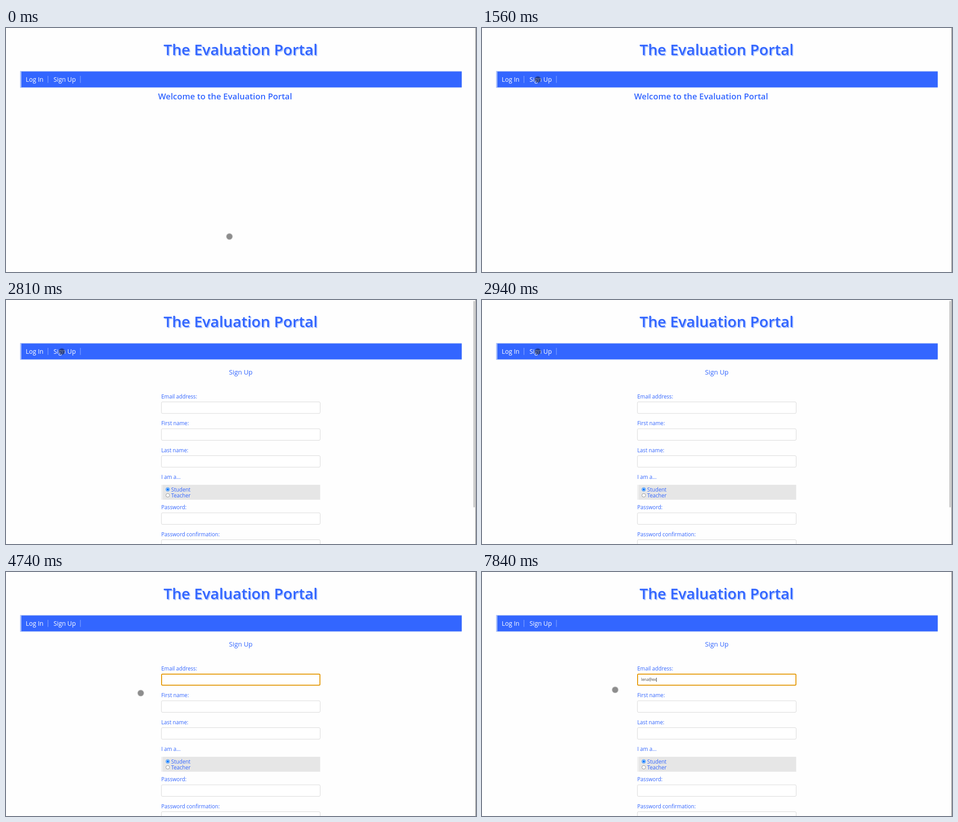
An HTML page for the animation above (8 s loop, 1036 by 540 pixels).

```html
<!DOCTYPE html>
<html lang="en">
<head>
<meta charset="utf-8">
<title>Sign up</title>
<style>
  html, body { margin: 0; width: 100%; height: 100%; overflow: hidden; background: #fefefe; }
  svg { display: block; font-family: "Open Sans", "Noto Sans", sans-serif; fill: #36f; }
  .title { font-size: 33px; font-weight: 600; text-anchor: middle; text-shadow: 2px 2px 1px #a9c2ff; }
  .welcome { font-size: 18.4px; font-weight: 600; text-anchor: middle; }
  .heading { font-size: 14.6px; font-weight: 500; text-anchor: middle; }
  .nav { font-size: 13.8px; fill: #fff; }
  .label { font-size: 11.7px; font-weight: 500; }
  .field { fill: #fff; stroke: #d6d6d6; }
  #link { stroke: #fff; }
  #value { font-size: 8.3px; fill: #444; }
</style>
</head>
<body>
<svg width="1036" height="540" viewBox="0 0 1036 540">
  <text class="title" x="517" y="60">The Evaluation Portal</text>
  <rect x="31" y="95.3" width="973.5" height="37" fill="#a9bff8"/>
  <rect x="34" y="96.5" width="970.5" height="34.6"/>
  <g class="nav">
    <text x="43.5" y="118.5">Log In</text>
    <text id="link" x="104.7" y="118.5">Sign Up</text>
    <path d="M92.5 106v15.5M164 106v15.5" stroke="#94b0ff"/>
  </g>

  <text id="home" class="welcome" x="483" y="157.5">Welcome to the Evaluation Portal</text>

  <g id="form">
    <text class="heading" x="517.5" y="164.5">Sign Up</text>
    <g id="fields"></g>
    <rect x="342.5" y="409" width="350" height="33" fill="#e6e6e6"/>
    <rect x="342.5" y="409" width="3" height="33" fill="#f0f0f0"/>
    <circle cx="356.5" cy="419.2" r="4" fill="#fff" stroke="#0075ff"/>
    <circle cx="356.5" cy="419.2" r="2.5" fill="#0075ff"/>
    <circle cx="356.5" cy="432.2" r="4" fill="#fff" stroke="#767676" stroke-width=".8"/>
    <text class="label" x="364" y="423.5">Student</text>
    <text class="label" x="364" y="436.5">Teacher</text>
    <rect id="focus" x="343" y="226" width="349" height="24.5" rx="2" fill="none" stroke="#e59700" stroke-width="2"/>
    <text id="value" x="350.8" y="241.2"></text>
    <rect id="caret" y="234" width="1" height="9" fill="#333"/>
    <rect id="thumb" x="1030.5" y="2" width="3" height="457" rx="1.5" fill="#bcbcbc"/>
  </g>

  <rect x="1035" width="1" height="540" fill="#666"/>
  <g id="cursor" fill="#000">
    <circle r="7.5" opacity=".2"/>
    <circle r="6.3" opacity=".3"/>
  </g>
</svg>
<script>
const LOOP = 8000;
const [link, home, form, fields, focusRing, value, caret, thumb, cursor] =
  ["link", "home", "form", "fields", "focus", "value", "caret", "thumb", "cursor"]
    .map(id => document.getElementById(id));

// label, baseline, top of its input box (if any)
fields.innerHTML = [
  ["Email address:", 217.7, 225.5], ["First name:", 277.2, 285],
  ["Last name:", 336.7, 344.5], ["I am a...", 396],
  ["Password:", 463.3, 471], ["Password confirmation:", 522.7, 530.5]
].map(([text, y, top]) =>
  `<text class="label" x="342.3" y="${y}">${text}</text>` +
  (top ? `<rect class="field" x="342.5" y="${top}" width="350" height="25.5" rx="2.5"/>` : "")
).join("");

// time, x, y
const path = [
  [570, 492.5, 461.5], [820, 485, 440], [970, 475, 411], [1020, 466, 381],
  [1070, 457.8, 354.3], [1120, 358.5, 270.5], [1320, 125.5, 132], [1370, 125.5, 132],
  [1520, 123, 114], [3220, 123, 114], [3270, 150, 122], [3320, 214, 152],
  [3420, 344.5, 241.5], [4520, 344.5, 241.5], [4570, 318, 254], [4720, 297, 268],
  [4870, 297, 268], [4920, 293.5, 260.7]
];
const typed = "lena@ex";
const keyTimes = [5940, 6090, 6310, 6550, 7320, 7560, 7840];

const ramp = (t, a, b) => Math.min(1, Math.max(0, (t - a) / (b - a)));
const show = (el, on) => el.setAttribute("visibility", on ? "inherit" : "hidden");

function pointAt(t) {
  const i = path.findIndex(p => p[0] > t);
  if (i === 0) return path[0].slice(1);
  if (i < 0) return path[path.length - 1].slice(1);
  const a = path[i - 1], b = path[i], k = ramp(t, a[0], b[0]);
  return [a[1] + (b[1] - a[1]) * k, a[2] + (b[2] - a[2]) * k];
}

function caretOn(t) {
  const last = keyTimes.filter(k => k <= t).pop();
  if (last) return t - last < 470;
  return t >= 4130 && t < 5630 && Math.floor((t - 4130) / 500) % 2 === 0;
}

function draw(t) {
  const signUp = t >= 2810;
  show(home, !signUp);
  show(form, signUp);
  // the hovered link grows slightly bolder
  link.setAttribute("stroke-width", signUp ? 0 : 0.5 * ramp(t, 2240, 2470));
  thumb.setAttribute("opacity", 1 - ramp(t, 3180, 3440));
  focusRing.setAttribute("opacity", ramp(t, 3900, 4380));

  const count = keyTimes.filter(k => k <= t).length;
  value.textContent = typed.slice(0, count);
  caret.setAttribute("x", 351 + Math.round(count ? value.getComputedTextLength() : 0));
  show(caret, signUp && caretOn(t));

  // the pointer is sampled every 50 ms
  const step = Math.floor((t - 20) / 50) * 50 + 20;
  cursor.setAttribute("transform", `translate(${pointAt(step)})`);
  show(cursor, t < 1150 || t >= 1370);
}

let start;
function tick(now) {
  start ??= now;
  draw((now - start) % LOOP);
  requestAnimationFrame(tick);
}
draw(0);
requestAnimationFrame(tick);
</script>
</body>
</html>
```
